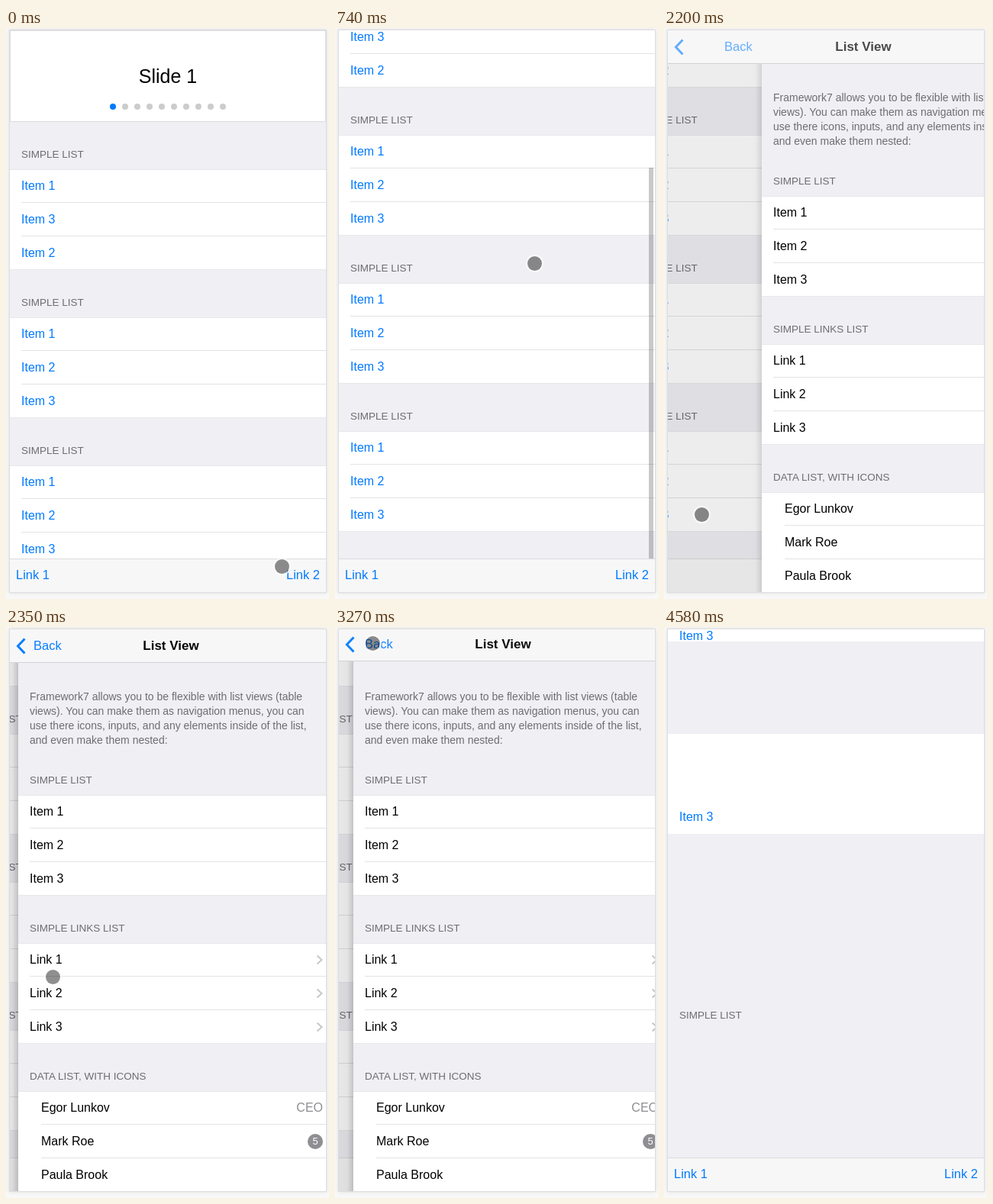
These frames come from a looping animation (423 by 748 pixels, 5440 ms). An HTML page:

```html
<!DOCTYPE html>
<html lang="en">
<head>
<meta charset="utf-8">
<title>List view demo</title>
<style>
html, body { margin: 0; width: 100%; height: 100%; overflow: hidden; background: #f8f8f8 }
body { position: relative; font: 16px "Liberation Sans", Arial, sans-serif; color: #000 }
div, h4, ul, p, span, svg { position: absolute; margin: 0; padding: 0; white-space: nowrap }
#app { left: 5px; top: 3px; width: 414px; height: 736px; overflow: hidden; background: #efeff4 }
#frame { left: 4px; top: 2px; width: 416px; height: 738px; box-shadow: 0 0 5px rgba(0,0,0,.1); background: #ddd }
.page { width: 414px; height: 736px; background: #efeff4 }
#view { width: 414px; height: 692px; overflow: hidden }
#content { width: 414px; height: 931px }
#slider { width: 412px; height: 118px; border: 1px solid #ddd; background: #fff }
#slider b { position: absolute; top: 95px; width: 8px; height: 8px; border-radius: 50%; background: #ccc }
#slider b:first-of-type { background: #007aff }
#slide { width: 100%; top: 39px; text-align: center; font-size: 25px; line-height: 40px }
h4 { left: 15px; font-weight: 400; font-size: 13.5px; line-height: 38px; color: #6d6d72 }
ul { width: 414px; list-style: none; background: #fff; box-shadow: inset 0 1px #e8e8ec, inset 0 -1px #e8e8ec }
li { position: relative; height: 44px; line-height: 43px; padding-left: 15px }
li:not(:last-child)::after { content: ""; position: absolute; left: 15px; right: 0; bottom: 0; height: 1px; background: #e3e3e5 }
.deep li { padding-left: 30px }
.deep li:not(:last-child)::after { left: 30px }
#home li, .link { color: #007aff }
li span { right: 15px; color: #8e8e93 }
li .badge { top: 12px; width: 20px; height: 20px; border-radius: 10px; background: #8e8e93; color: #fff; font-size: 13px; line-height: 20px; text-align: center }
li svg { left: 390px; top: 15px; fill: none; stroke: #c7c7cc; stroke-width: 2 }
p { left: 15px; top: 79px; font-size: 14px; line-height: 19px; color: #6d6d72 }
.bar { width: 414px; height: 44px; line-height: 43px; background: #f7f7f8; font-size: 16.5px }
#tools { top: 692px; box-shadow: inset 0 1px #dcdcde }
#nav { box-shadow: inset 0 -1px #d3d3d6 }
#title { left: 0; width: 414px; text-align: center; font-size: 17px; font-weight: 700 }
#label { left: 27px }
#arrow { left: 8px; top: 11px; fill: none; stroke: #007aff; stroke-width: 3 }
.thumb { left: 406px; width: 6px; background: #000 }
#dim { width: 414px; height: 736px; background: #000 }
#shade { left: -16px; width: 16px; height: 736px; background: linear-gradient(90deg, transparent, rgba(0,0,0,.01) 50%, rgba(0,0,0,.16)) }
#stale { top: 16px; width: 414px; height: 676px; background: #efeff4 }
#stale ul { top: 121px; height: 131px; box-shadow: none }
#stale li { top: 87px }
#cursor { left: -9px; top: -9px; width: 19px; height: 19px; border-radius: 50%; background: rgba(0,0,0,.44); box-shadow: 0 0 0 2px rgba(255,255,255,.7) }
</style>
</head>
<body>
<div id="frame"></div>
<div id="app">
  <div id="home" class="page">
    <div id="view">
      <div id="content"><div id="slider"><div id="slide">Slide 1</div></div></div>
      <div id="thumb" class="thumb" style="height:512px"></div>
    </div>
    <div id="stale"><ul><li>Item 3</li></ul><h4 style="top:471px">SIMPLE LIST</h4></div>
    <div id="tools" class="bar"><span class="link" style="left:8px">Link 1</span><span class="link" style="right:8px">Link 2</span></div>
    <div id="dim"></div>
  </div>
  <div id="list" class="page">
    <div id="shade"></div>
    <p>Framework7 allows you to be flexible with list views (table<br>views). You can make them as navigation menus, you can<br>use there icons, inputs, and any elements inside of the list,<br>and even make them nested:</p>
    <div class="thumb" style="top:44px;height:62px;opacity:.2"></div>
  </div>
  <div id="nav" class="bar">
    <svg id="arrow" width="14" height="22"><path d="M11.5 1.5 2.5 11l9 9.5"/></svg>
    <span id="label" class="link">Back</span>
    <div id="title">List View</div>
  </div>
</div>
<div id="cursor"></div>
<script>
const $ = id => document.getElementById(id);
const add = (id, html) => $(id).insertAdjacentHTML('beforeend', html);
const list = (id, top, title, rows, cls = '') => add(id,
  `<h4 style="top:${top - 38}px">${title}</h4>
   <ul class="${cls}" style="top:${top}px">${rows.map(r => `<li>${r}</li>`).join('')}</ul>`);

const chevron = '<svg width="10" height="14"><path d="M1.5 1.5 7.5 7l-6 5.5"/></svg>';
const items = ['Item 1', 'Item 2', 'Item 3'];
for (let i = 0; i < 10; i++) add('slider', `<b style="left:${130 + 16 * i}px"></b>`);
for (let i = 0; i < 4; i++)
  list('content', 182 + 194 * i, 'SIMPLE LIST', i ? items : ['Item 1', 'Item 3', 'Item 2']);
list('list', 217, 'SIMPLE LIST', items);
list('list', 411, 'SIMPLE LINKS LIST', [1, 2, 3].map(n => `Link ${n}${chevron}`));
list('list', 605, 'DATA LIST, WITH ICONS',
  ['Egor Lunkov<span>CEO</span>', 'Mark Roe<span class="badge">5</span>', 'Paula Brook'], 'deep');
$('list').append($('list').querySelector('.thumb'));

const LOOP = 5440, WIDTH = 414, SCROLL = 239, PUSH = 2035, POP = 3246, SLIDE = 400;
const clamp = x => Math.max(0, Math.min(1, x));
const smooth = x => (x = clamp(x), x * x * (3 - 2 * x));

// CSS "ease" curve, solved by bisection
function ease(x) {
  if (x <= 0 || x >= 1) return clamp(x);
  const bez = (u, p, q) => 3 * u * (1 - u) * ((1 - u) * p + u * q) + u ** 3;
  let lo = 0, hi = 1;
  for (let i = 0; i < 20; i++) {
    const mid = (lo + hi) / 2;
    if (bez(mid, .25, .25) < x) lo = mid; else hi = mid;
  }
  return bez(lo, .1, 1);
}

// time, x, y, and the easing towards that point
const path = [
  [20, 361, 705], [270, 261, 308, smooth], [840, 261, 308], [1430, 49, 637, smooth],
  [2210, 49, 637], [2570, 80, 179], [2650, 81, 110], [2800, 73, 29], [3050, 49, 21, smooth],
  [3980, 49, 21], [4560, 379, 765, smooth], [LOOP, 379, 765]
];
function cursorAt(t) {
  const i = Math.max(1, path.findIndex(k => k[0] >= t));
  const [t0, x0, y0] = path[i - 1], [t1, x1, y1, fn = clamp] = path[i];
  const u = fn(clamp((t - t0) / (t1 - t0)));
  return [x0 + (x1 - x0) * u, y0 + (y1 - y0) * u];
}

// whole pixels keep text and lines sharp
const move = (id, x, y) => $(id).style.transform = `translate(${Math.round(x)}px,${Math.round(y)}px)`;
const fade = (id, a) => $(id).style.opacity = a;
const show = (id, on) => $(id).style.visibility = on ? 'visible' : 'hidden';

function draw(t) {
  const back = t >= POP;
  const p = back ? 1 - ease((t - POP) / SLIDE) : ease((t - PUSH) / SLIDE);
  const scroll = SCROLL * smooth((t - 370) / 370);
  move('content', 0, -scroll);
  move('thumb', 0, scroll * 180 / SCROLL);
  fade('thumb', t < 390 || t > PUSH ? 0 : .21 - .15 * clamp((t - 860) / 570));

  move('home', -.2 * WIDTH * p, 0);
  move('list', WIDTH * (1 - p), 0);
  fade('dim', .1 * p);
  fade('shade', p);
  show('list', p > 0);
  show('stale', t >= POP + SLIDE);

  const tapped = t > 3090 && !back;
  show('nav', p > 0);
  move('nav', 0, back ? -44 * (1 - p) : 0);
  move('title', 165 * (1 - p), 0);
  move('label', 160 * (1 - p), 0);
  fade('title', p);
  for (const id of ['label', 'arrow']) fade(id, tapped ? .3 : p ** 1.5);

  move('cursor', ...cursorAt(t));
}

function tick() {
  draw(performance.now() % LOOP);
  requestAnimationFrame(tick);
}
tick();
</script>
</body>
</html>
```
